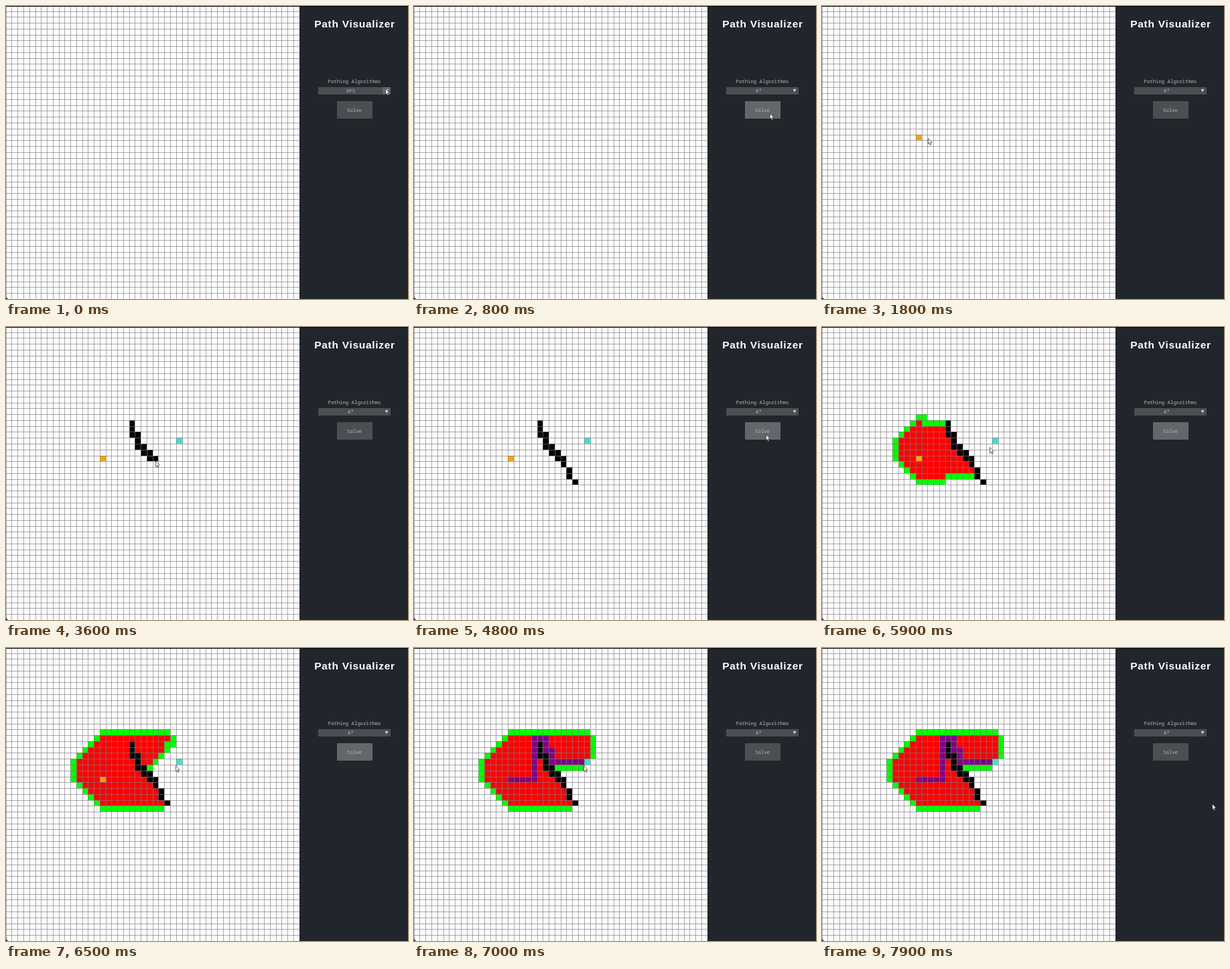
These frames come from a looping animation (600x437 px, 8 s). An HTML page with a canvas:

```html
<!DOCTYPE html>
<html lang="en">
<head>
<meta charset="utf-8">
<title>Path Visualizer</title>
<style>
  html, body { margin: 0; width: 100%; height: 100%; overflow: hidden; background: #21262d; }
  canvas { display: block; }
</style>
</head>
<body>
<canvas id="stage" width="600" height="437"></canvas>
<script>
const ctx = document.getElementById('stage').getContext('2d');
const LOOP = 8000, STEP = 100, SIZE = 50, PITCH = 8.76;
const PANEL = '#21262d', BUTTON = '#4b4f52', HOVER = '#63676a', TEXT = '#b3b8bf';
const OPEN = '#00ff00', CLOSED = '#ff0000', PATH = '#800080', LINE = 'rgba(128,122,128,.66)';
const MONO = '7.3px "Noto Sans Mono", "DejaVu Sans Mono", monospace';

const start = [16, 22], goal = [29, 19];
const START_SET = 1700, GOAL_SET = 2400, DRAG_FROM = 3100, DRAG_TO = 3900;
const SEARCH_FROM = 5040, STEPS_PER_MS = 0.095;

const dropdown = [466, 121, 108, 11], arrow = [562, 121, 12, 11], solve = [494, 142, 53, 26];

// Wall stroke: South, East or Diagonal to the next cell
const heading = { S: [0, 1], E: [1, 0], D: [1, 1] };
const walls = [[21, 16]];
for (const letter of 'SSESSESESESDSD') {
  const [x, y] = walls[walls.length - 1], [dx, dy] = heading[letter];
  walls.push([x + dx, y + dy]);
}

// Pointer moves: from, to, x, y
const moves = [
  [200, 500, 548, 158], [700, 1500, 147, 199], [1700, 1800, 158, 197],
  [1800, 2400, 255, 170], [2500, 3000, 184, 140], [DRAG_FROM, DRAG_TO, 241, 227],
  [3900, 4600, 525, 160], [5200, 5800, 250, 179], [6100, 6500, 253, 175], [7000, 7800, 582, 232]
];

function ease(t, from, to) {
  const p = Math.min(1, Math.max(0, (t - from) / (to - from)));
  return p * p * (3 - 2 * p);
}
function pointerAt(t) {
  return moves.reduce(([x, y], [from, to, nx, ny]) => {
    const p = ease(t, from, to);
    return [x + (nx - x) * p, y + (ny - y) * p];
  }, [566, 123]);
}
const inside = ([px, py], [x, y, w, h]) => px >= x && px < x + w && py >= y && py < y + h;

// A* with Manhattan distance; ties go to the cell found first.
function search() {
  const id = (x, y) => y * SIZE + x;
  const blocked = new Set(walls.map(w => id(...w)));
  const node = (x, y, g, from, found) =>
    ({ x, y, g, from, found, f: g + Math.abs(x - goal[0]) + Math.abs(y - goal[1]) });
  const first = node(...start, 0, null, 0);
  const queue = [first], nodes = [first], path = [];
  const seen = new Set([id(...start)]);
  let step = 0, current;
  while (queue.length) {
    let best = 0;
    queue.forEach((n, i) => { if (n.f < queue[best].f) best = i; });
    current = queue.splice(best, 1)[0];
    current.expanded = ++step;
    if (current.x === goal[0] && current.y === goal[1]) break;
    for (const [dx, dy] of [[0, 1], [1, 0], [0, -1], [-1, 0]]) {
      const x = current.x + dx, y = current.y + dy, key = id(x, y);
      if (x < 0 || y < 0 || x >= SIZE || y >= SIZE || blocked.has(key) || seen.has(key)) continue;
      seen.add(key);
      const next = node(x, y, current.g + 1, current, step);
      queue.push(next);
      nodes.push(next);
    }
  }
  while ((current = current.from)) path.push(current);
  return { nodes, path, steps: step };
}
const solved = search();

const colX = c => Math.round(c * PITCH - 0.3);
const rowY = r => Math.round(r * PITCH - 1.2);

function rect(color, x, y, w, h) {
  ctx.fillStyle = color;
  ctx.fillRect(x, y, w, h);
}
function cell(color, c, r) {
  rect(color, colX(c), rowY(r), colX(c + 1) - colX(c), rowY(r + 1) - rowY(r));
}
function label(text, x, y, color = TEXT, font = MONO) {
  ctx.font = font;
  ctx.fillStyle = color;
  ctx.textAlign = 'center';
  ctx.fillText(text, x, y);
}
function shape(points, color) {
  ctx.beginPath();
  points.forEach(p => ctx.lineTo(...p));
  ctx.closePath();
  ctx.fillStyle = color;
  ctx.fill();
}

function drawBoard(t, step) {
  rect('#fff', 0, 0, 438, 437);
  if (step > 0) {
    for (const n of solved.nodes) {
      if (n.found <= step) cell(n.expanded < step ? CLOSED : OPEN, n.x, n.y);
    }
  }
  const drawn = Math.ceil(walls.length * ease(t, DRAG_FROM, DRAG_TO));
  walls.slice(0, drawn).forEach(w => cell('#000', ...w));
  if (t >= START_SET) cell('#ffa500', ...start);
  if (t >= GOAL_SET) cell('#40e0d0', ...goal);
  solved.path.slice(0, Math.max(0, step - solved.steps)).forEach(n => cell(PATH, n.x, n.y));
  for (let i = 0; i < SIZE; i++) {
    rect(LINE, colX(i), 0, 1, 437);
    rect(LINE, 0, rowY(i), 438, 1);
  }
  shape([[0, 433], [1, 435.5], [3.5, 437], [0, 437]], '#111');
}

function drawPanel(t, step, pointer) {
  const listOpen = t >= 200 && t < 600;
  const searching = step > 0 && step < solved.steps + solved.path.length;
  const button = (box, hot = inside(pointer, box)) => rect(hot ? HOVER : BUTTON, ...box);
  rect(PANEL, 438, 0, 162, 437);
  ctx.letterSpacing = '0.7px';
  label('Path Visualizer', 520.5, 32, '#fff', 'bold 15.5px "Liberation Sans", Arial, sans-serif');
  ctx.letterSpacing = '0px';
  label('Pathing Algorithms', 520, 115);
  button(dropdown, false);
  button(arrow);
  label(t < 600 ? 'DFS' : 'A*', 514.5, 129);
  shape([[565.6, 124], [570.4, 124], [568, 128.6]], '#d0d4da');
  button(solve, searching || inside(pointer, solve));
  label('Solve', 520, 157.7);
  if (listOpen) {
    ['DFS', 'BFS', 'A*'].forEach((name, i) => {
      const y = 132 + i * 12;
      button([466, y, 108, 12]);
      label(name, 520, y + 8.7);
    });
  }
}

function drawPointer(pointer) {
  ctx.save();
  ctx.translate(...pointer);
  shape([[0.5, 0.5], [0.5, 9], [2.3, 7.4], [3.6, 10.4], [5, 9.8], [3.7, 6.9], [6.2, 6.6]], '#fff');
  ctx.strokeStyle = '#222';
  ctx.lineWidth = 0.7;
  ctx.stroke();
  ctx.restore();
}

function frame(now) {
  const t = Math.floor((now % LOOP) / STEP) * STEP;
  const step = Math.floor((t - SEARCH_FROM) * STEPS_PER_MS);
  const pointer = pointerAt(t);
  drawBoard(t, step);
  drawPanel(t, step, pointer);
  rect('#000', 0, 0, 600, 1);
  drawPointer(pointer);
  requestAnimationFrame(frame);
}
frame(performance.now());
</script>
</body>
</html>
```
